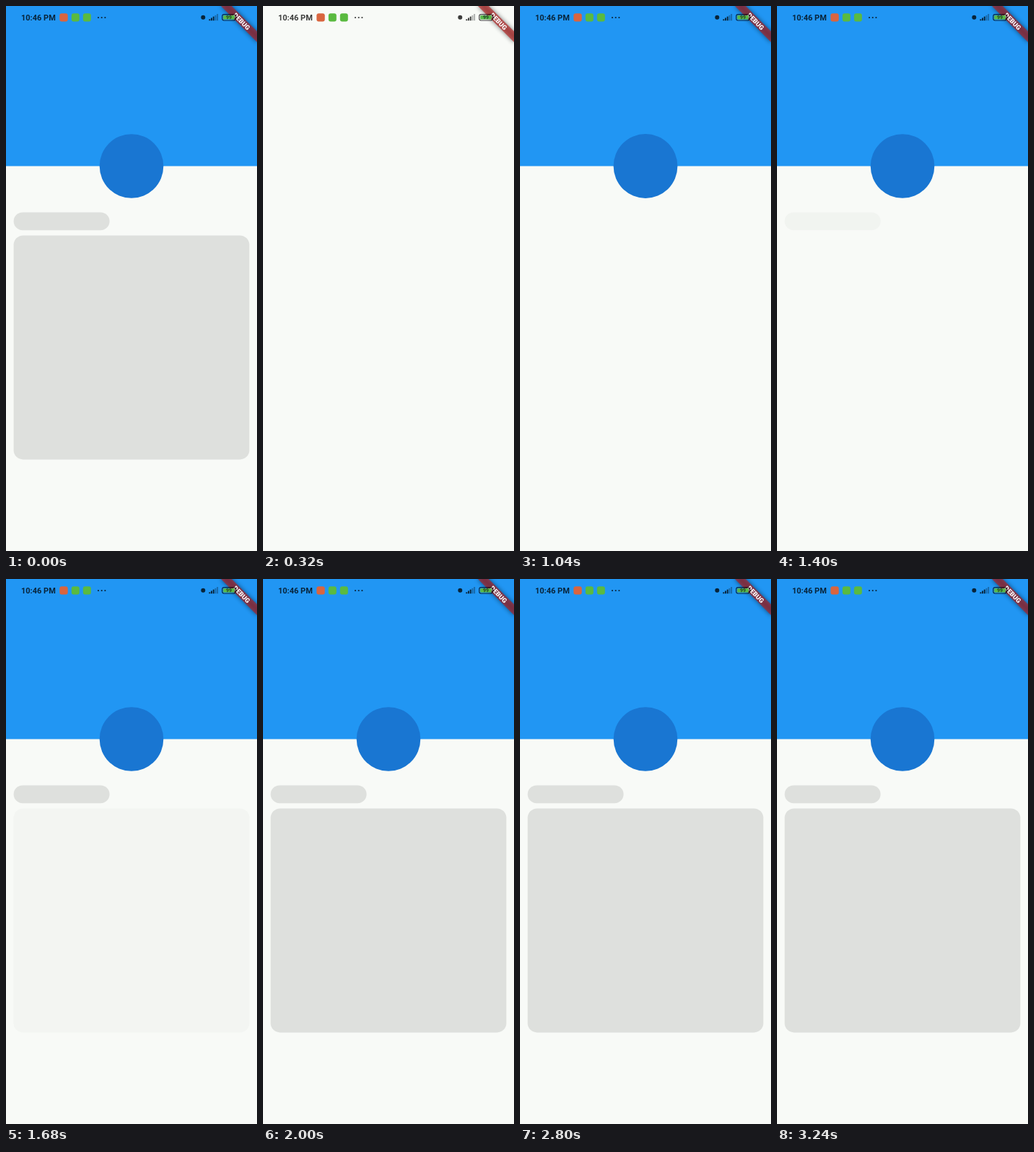
Recreate the animation shown at these times as an HTML page. Size 348 by 754 pixels, loop 3.28 s.

```html
<!DOCTYPE html>
<html lang="en">
<head>
<meta charset="utf-8">
<title>Profile placeholder</title>
<style>
  html, body { margin: 0; width: 100%; height: 100%; overflow: hidden; background: #f8faf7; }
  svg { display: block; width: 100vw; height: 100vh; }
  text { font-family: Roboto, sans-serif; font-weight: 700; }
</style>
</head>
<body>
<svg viewBox="0 0 348 754">
  <defs>
    <filter id="blur" x="-30%" y="-150%" width="160%" height="400%">
      <feGaussianBlur stdDeviation="3.3"/>
    </filter>
  </defs>
  <rect width="348" height="754" fill="#f8faf7"/>
  <rect id="header" width="348" fill="#2196f3"/>
  <circle id="avatar" cx="174" cy="221.5" fill="#1976d2"/>
  <rect id="title" x="10.6" y="285.4" width="133" height="24.8" rx="12.4" fill="#dee0dd"/>
  <rect id="body" x="10.6" y="317.4" width="326.8" height="310" rx="13" fill="#dee0dd"/>

  <g transform="translate(348 0) rotate(45)">
    <rect x="-35.4" y="24.8" width="70.8" height="10.6" fill="#000" opacity=".5" filter="url(#blur)"/>
    <rect x="-35.4" y="24.8" width="70.8" height="10.6" fill="#b71c1c" opacity=".63"/>
    <text x="0" y="33.3" font-size="9" text-anchor="middle" fill="#fff" style="font-weight:900">DEBUG</text>
  </g>

  <g fill="#000" fill-opacity=".76">
    <text x="21" y="20" font-size="11">10:46 PM</text>
    <circle cx="128" cy="16" r="1.1"/>
    <circle cx="132.7" cy="16" r="1.1"/>
    <circle cx="137.4" cy="16" r="1.1"/>
    <circle cx="273.3" cy="15.8" r="3"/>
    <g id="signal"></g>
  </g>
  <rect x="74.3" y="10.3" width="11.4" height="11.2" rx="3" fill="#d9653f"/>
  <rect x="90.8" y="10.3" width="11" height="11.2" rx="3" fill="#5aba40"/>
  <rect x="106.8" y="10.3" width="11" height="11.2" rx="3" fill="#5aba40"/>
  <rect x="299.8" y="11.6" width="18.4" height="8.4" rx="2.4" fill="none" stroke="#000" stroke-opacity=".72" stroke-width="1.2"/>
  <rect x="301.2" y="13" width="15.6" height="5.6" rx="1" fill="#58b948"/>
  <rect x="319" y="14.2" width="1.2" height="3.2" rx=".6" fill="#000" opacity=".7"/>
  <text x="309" y="18.4" font-size="7" text-anchor="middle" fill="#234428">99</text>
</svg>
<script>
const LOOP = 3280, STEP = 40, CLEAR = 80, ENTER = 363, DURATION = 1500;
const HEADER = 221.5, RADIUS = 44.3;
const byId = id => document.getElementById(id);
const [header, avatar, title, body] = ['header', 'avatar', 'title', 'body'].map(byId);

const heights = [2, 3.8, 5.6, 7.4, 9.2];
byId('signal').innerHTML = heights.map((h, i) =>
  `<rect x="${281.4 + i * 2.7}" y="${20.2 - h}" width="1.9" height="${h}" opacity="${i < 3 ? 1 : 0.4}"/>`
).join('');

// cubic-bezier(.42, 0, 1, 1)
function easeIn(x) {
  let lo = 0, hi = 1;
  for (let i = 0; i < 24; i++) {
    const s = (lo + hi) / 2, u = 1 - s;
    if (1.26 * s * u * u + 3 * s * s * u + s ** 3 < x) lo = s; else hi = s;
  }
  return lo * lo * (3 - 2 * lo);
}

const elasticOut = x => 1 + 2 ** (-10 * x) * Math.sin((x - 0.1) * 5 * Math.PI);

function interval(p, from, to, ease) {
  const x = (p - from) / (to - from);
  return x <= 0 ? 0 : x >= 1 ? 1 : ease(x);
}

function draw(time) {
  const t = Math.floor((time % LOOP) / STEP) * STEP;
  const p = t < CLEAR ? 1 : (t - ENTER) / DURATION;
  header.setAttribute('height', HEADER * interval(p, 0, 0.3, easeIn));
  avatar.setAttribute('r', Math.max(0, RADIUS * interval(p, 0.3, 0.6, elasticOut)));
  title.setAttribute('opacity', interval(p, 0.6, 0.8, easeIn));
  body.setAttribute('opacity', interval(p, 0.8, 1, easeIn));
}

const start = performance.now();
function tick() {
  draw(performance.now() - start);
  requestAnimationFrame(tick);
}
tick();
</script>
</body>
</html>
```
